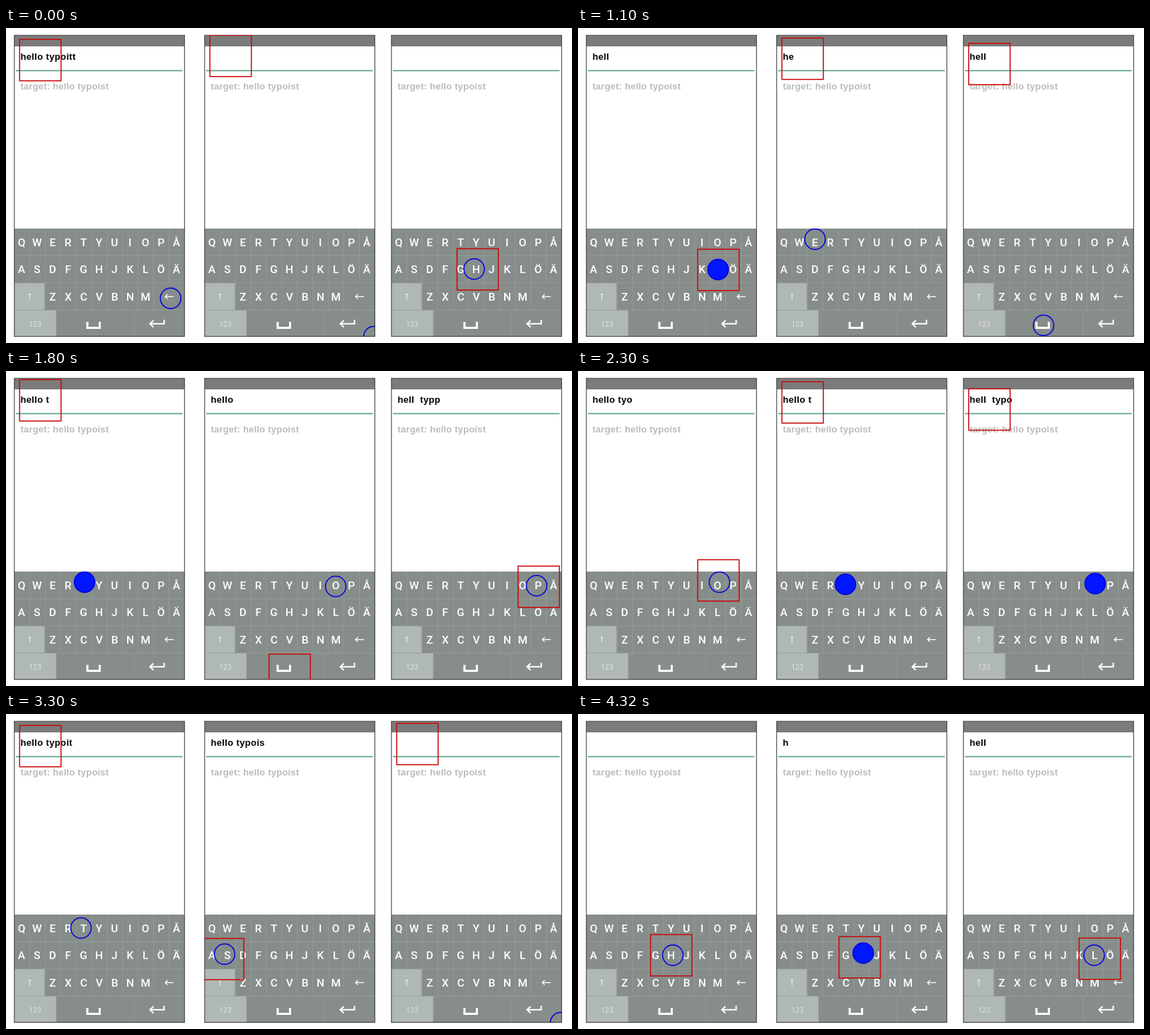
These frames come from a looping animation (800x446 px, 4430 ms). An HTML page:

```html
<!DOCTYPE html>
<html lang="en">
<head>
<meta charset="utf-8">
<style>
  html, body { margin: 0; width: 100%; height: 100%; overflow: hidden; background: #fff; }
  svg { display: block; width: 800px; height: 446px; }
  .field { font: bold 13px "Liberation Sans", Arial, sans-serif; white-space: pre; }
  .typed { letter-spacing: .35px; }
  .goal { letter-spacing: .2px; fill: #bbb; }
  .key { font: 500 15.5px Roboto, sans-serif; fill: #fff; text-anchor: middle; }
  .mode { font: 10.5px Roboto, sans-serif; fill: #dde1de; text-anchor: middle; }
  .icon { fill: none; stroke: #fff; }
  .eye { fill: none; stroke: #cb0808; stroke-width: 1.5; }
  .finger { stroke: #0000e0; stroke-width: 1.5; }
</style>
</head>
<body>
<svg viewBox="0 0 800 446">
  <defs>
    <clipPath id="screen"><rect x="11.5" y="10" width="241" height="427"/></clipPath>
    <g id="phone">
      <rect x="12" y="10.5" width="240.5" height="426" fill="#fff"/>
      <rect x="12" y="11" width="240" height="15" fill="#7b7b7b"/>
      <path d="M14 60.3H249.5" stroke="#62a48e" stroke-width="1.8"/>
      <text class="field goal" x="20.5" y="86.5">target: hello typoist</text>
      <rect x="12" y="284" width="240" height="153" fill="#868d8a"/>
      <path d="M12 361h42.5v38h16.5v38H12z" fill="#b0b8b3"/>
      <path id="grid" fill="none" stroke="#979e9b" stroke-width=".8"/>
      <g id="keys"></g>
      <text class="mode" x="41" y="422.5">123</text>
      <path class="icon" stroke-width="1" stroke="#fff" opacity=".8" d="M33.5 384.500v-8.500m-2 2l2-2 2 2"/>
      <path class="icon" stroke-width="1.3" d="M237 380.300h-12m3.500-3.300l-3.500 3.300 3.500 3.300"/>
      <path class="icon" stroke-width="3" d="M115 416v8.500h17.500v-8.500"/>
      <path class="icon" stroke-width="2" d="M223.500 413v5.800h-20m5-4.800l-5 4.800 5 4.800"/>
      <rect x="11.800" y="10.300" width="240.500" height="426.400" fill="none" stroke="#333"/>
    </g>
  </defs>
  <g id="stage"></g>
</svg>
<script>
const NS = "http://www.w3.org/2000/svg";
const byId = id => document.getElementById(id);

function add(parent, tag, attrs, text = "") {
  const node = document.createElementNS(NS, tag);
  for (const name in attrs) node.setAttribute(name, attrs[name]);
  node.textContent = text;
  return parent.appendChild(node);
}

// Keyboard layout
const keys = { "_": [124, 420], "<": [230, 380], ".": [251, 437] };
[["qwertyuiopå", 22], ["asdfghjklöä", 22], ["zxcvbnm", 66]].forEach(([row, left], r) => {
  [...row].forEach((letter, i) => {
    const x = left + i * 21.9, y = 303 + r * 38.5;
    keys[letter] = [x, y];
    add(byId("keys"), "text", { class: "key", x, y: y + 5.7 }, letter.toUpperCase());
  });
});

let grid = "M12 322.5H252M12 361H252M12 399.5H252M71 399.5V437M181 399.5V437";
for (let i = 1; i < 11; i++) {
  const x = 11.5 + i * 21.9;
  grid += `M${x} 284V361`;
  if (i > 1 && i < 10) grid += `M${x} 361V399.5`;
}
byId("grid").setAttribute("d", grid);

// Each step: tick, action, optional position.
// "." resets, "@" moves the gaze, "<" deletes, "_" is a space, letters are typed.
const phones = [
  { x: 0, period: 37, shift: 31, script: `0.48.5,51.5 1h 2e 3l 5l198,342 4@198.5,342.5
    7o 9_ 12t111,299 12@48.5,41.5 14y 16o200,299 16@198.5,296.5 18@48.5,45 19< 21p 22o 24i
    26t106,303 27@48.5,45.5 30t109,303 31@48.5,45.5 32< 33< 34s 36t` },
  { x: 269, period: 41, shift: 0, script: `0.48.5,39.5 2h 4l 7<231,378 5@201,335.5 6@201,335.5
    10e66,299 11@48.5,43.5 13l 14l 16o197,305 17@132,430 20_ 23t109,302 23@48.5,44.5
    25y 27p 28o 30i 32s40,340 32@38,347 35t 36@48.5,39.5` },
  { x: 533, period: 37, shift: 4, script: `0.48.5,42.5 5h 6e 8l 9l196.5,341.5 8@204.5,346.5
    13_125,421 14@48.5,51 17_ 18t 19y 20p 21p217,304 21@220,305.5 24< 27o198,301
    27@48.5,54.5 29i 32s 34t 35@48.5,45.5` }
];

const jitter = (n, [x, y]) => [x + 3 * Math.sin(n * 7.3), y + 3 * Math.cos(n * 4.7)];

function parse(script) {
  return script.trim().split(/\s+/).map(step => {
    const [, tick, action, x, y] = step.match(/^(\d+)(\D)([\d.]*),?([\d.]*)$/);
    return { tick: +tick, action, at: x ? [+x, +y] : null };
  });
}

function buildStates(script, period) {
  const steps = parse(script);
  const presses = steps.filter(s => !"@.".includes(s.action));
  const gazes = steps.filter(s => s.action === "@");
  let text = "", eye = steps[0].at, finger = keys["."];
  return Array.from({ length: period }, (_, tick) => {
    const press = presses.find(s => s.tick === tick);
    const next = presses.find(s => s.tick === tick + 1);
    const gaze = gazes.find(s => s.tick === tick);
    const target = press || next;
    if (target) {
      const home = keys[target.action];
      finger = target.at || jitter(target.tick, home);
      eye = jitter(target.tick + 2, home);
    }
    if (gaze) eye = gaze.at;
    else if (press && gazes.some(s => s.tick === tick - 1)) {
      eye = gazes.find(s => s.tick === tick - 1).at;
    }
    if (press) {
      text = press.action === "<" ? text.slice(0, -1) : text + press.action.replace("_", " ");
    }
    return { text, eye, finger, pressed: !!press };
  });
}

for (const phone of phones) {
  phone.states = buildStates(phone.script, phone.period);
  const group = add(byId("stage"), "g", { transform: `translate(${phone.x})` });
  add(group, "use", { href: "#phone" });
  const screen = add(group, "g", { "clip-path": "url(#screen)" });
  phone.text = add(screen, "text", { class: "field typed", x: 20.5, y: 44.5 });
  phone.finger = add(screen, "circle", { class: "finger", r: 14.5 });
  phone.eye = add(screen, "rect", { class: "eye", width: 58.5, height: 58.5 });
}

function set(node, attrs) {
  for (const name in attrs) node.setAttribute(name, attrs[name]);
}

function draw(tick) {
  for (const phone of phones) {
    const { text, eye, finger, pressed } = phone.states[(tick + phone.shift) % phone.period];
    phone.text.textContent = text;
    set(phone.eye, { x: eye[0] - 29.25, y: eye[1] - 29.25 });
    set(phone.finger, { cx: finger[0], cy: finger[1], fill: pressed ? "#0016ff" : "none" });
  }
}

const LOOP = 4430, LAST_START = 4320;
const start = performance.now();
let shown = -1;

function play(now) {
  const time = Math.max(0, now - start) % LOOP;
  const tick = time >= LAST_START ? 43 : Math.min(42, Math.floor(time / 100));
  if (tick !== shown) draw(shown = tick);
  requestAnimationFrame(play);
}
play(start);
</script>
</body>
</html>
```
